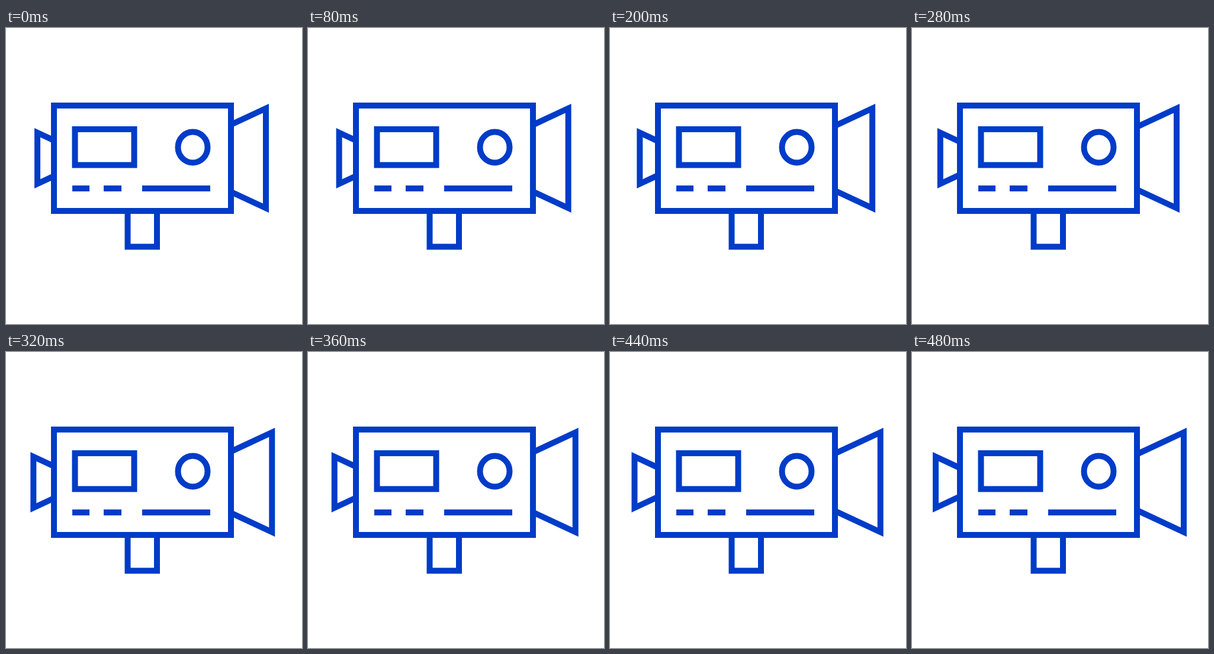
An HTML page with a canvas that plays this animation: 500 px wide and 500 px high, repeating every 0.52 s.

```html
<!DOCTYPE html>
<html lang="en">
<head>
<meta charset="utf-8">
<title>Camera</title>
<style>
  html, body { margin: 0; width: 100%; height: 100%; overflow: hidden; background: #fff; }
  canvas { display: block; }
</style>
</head>
<body>
<canvas id="stage" width="500" height="500"></canvas>
<script>
const ctx = document.getElementById('stage').getContext('2d');
const STEP = 40, STEPS = 13;
const SLOPE = 0.466, MIDDLE = 220;

function line(...points) {
  ctx.beginPath();
  points.forEach(([x, y]) => ctx.lineTo(x, y));
  ctx.stroke();
}

// A flared hood whose sides end inside the body's outline.
function hood(edgeX, bodyX, halfHeight) {
  const half = halfHeight - Math.abs(edgeX - bodyX) * SLOPE;
  line([bodyX, MIDDLE - half], [edgeX, MIDDLE - halfHeight],
       [edgeX, MIDDLE + halfHeight], [bodyX, MIDDLE + half]);
}

function draw(time) {
  const u = Math.floor(time / STEP) % STEPS / (STEPS - 1);
  const spread = u * u * (1.2 - 0.2 * u ** 4);

  ctx.fillStyle = '#fff';
  ctx.fillRect(0, 0, 500, 500);
  ctx.strokeStyle = '#003cc8';
  ctx.lineWidth = 10;

  hood(53 - 13 * spread, 81, 43.2);
  hood(439 + 20 * spread, 380, 84.2);

  ctx.strokeRect(81, 131, 299, 178);
  ctx.strokeRect(116.5, 171, 100, 60.5);
  ctx.beginPath();
  ctx.ellipse(315.5, 201.5, 25, 26, 0, 0, Math.PI * 2);
  ctx.stroke();

  for (const [from, to] of [[112, 141], [165, 195], [230, 345]]) {
    line([from, 271], [to, 271]);
  }
  line([205.5, 309], [205.5, 369.5], [255, 369.5], [255, 309]);
}

function tick() {
  draw(performance.now());
  requestAnimationFrame(tick);
}
tick();
</script>
</body>
</html>
```
